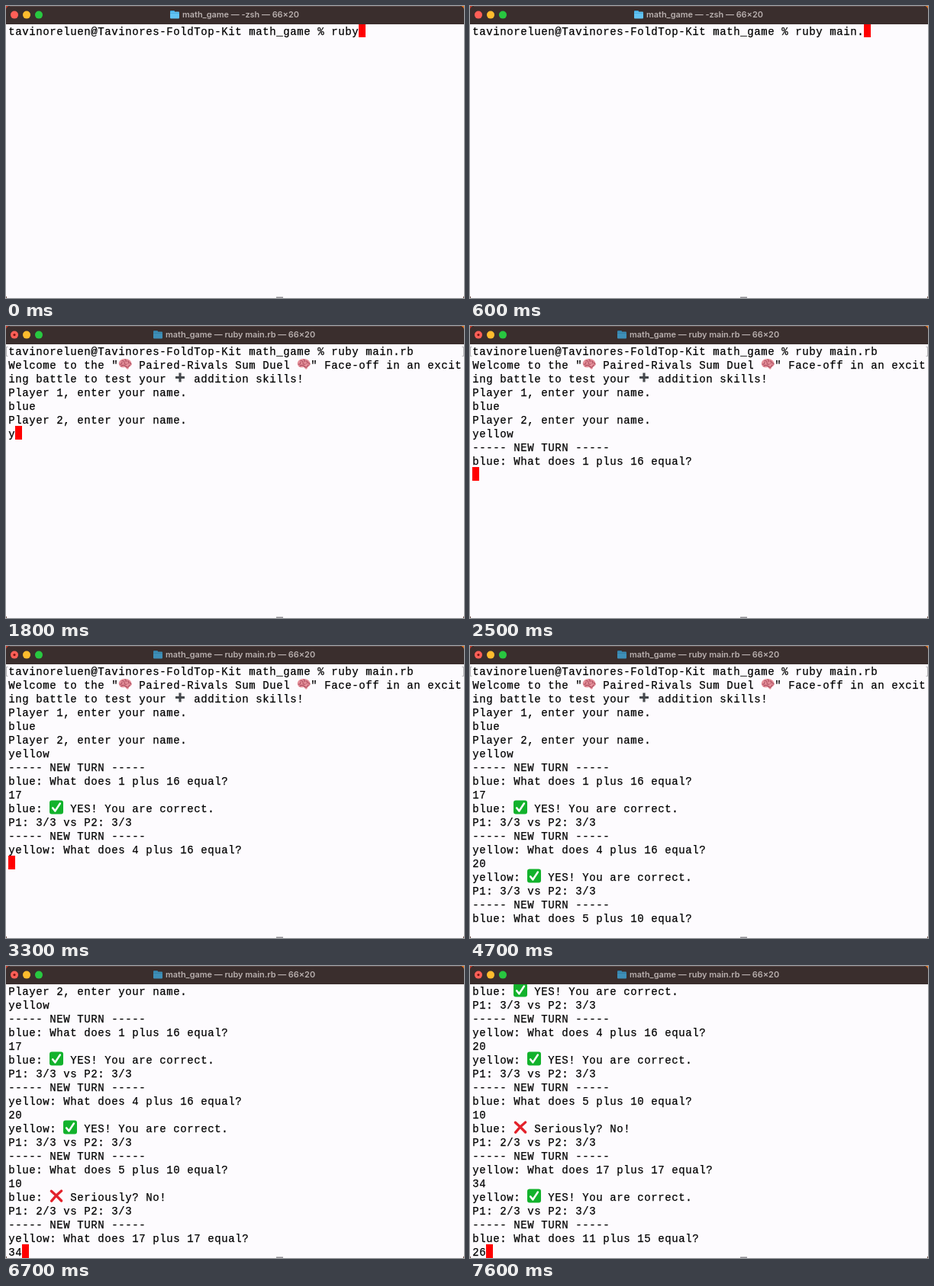
An HTML page with a canvas for the animation above (8 s loop, 600 by 383 pixels).

```html
<!DOCTYPE html>
<html lang="en">
<head>
<meta charset="utf-8">
<title>Terminal game</title>
<style>
html, body { margin: 0; width: 100%; height: 100%; overflow: hidden; background: #fdfbfe; }
canvas { display: block; width: 600px; height: 383px; }
</style>
</head>
<body>
<canvas id="stage" width="600" height="383"></canvas>
<script>
const ctx = document.getElementById('stage').getContext('2d');
const LOOP = 8000, ROWS = 20, CELL = 9, LINE = 18, LEFT = 3, TOP = 23, BAR = 24;
const MONO = '14px "Liberation Mono", monospace';
const SANS = '600 10.9px Inter, "Open Sans", sans-serif';
const LAUNCH = 1000;

// Terminal output, keyed by the moment it appears.
const events = [];
const print = (time, text) => events.push({ time, text });
const type = (time, text, step = 100) =>
  [...text].forEach((ch, i) => print(time + i * step, ch));

const RIGHT = '✅ YES! You are correct.';
const WRONG = '❌ Seriously? No!';
const turn = (name, a, b) => `----- NEW TURN -----\n${name}: What does ${a} plus ${b} equal?\n`;
const result = (name, verdict, lives) => `\n${name}: ${verdict}\nP1: ${lives}/3 vs P2: 3/3\n`;

print(0, 'tavinoreluen@Tavinores-FoldTop-Kit math_game % ruby');
type(100, ' main.rb');
print(LAUNCH, '\nWelcome to the "🧠 Paired-Rivals Sum Duel 🧠" Face-off in an excit\n' +
  'ing battle to test your ➕ addition skills!\nPlayer 1, enter your name.\n');
type(1200, 'blue');
print(1600, '\nPlayer 2, enter your name.\n');
type(1800, 'yellow');
print(2400, '\n' + turn('blue', 1, 16));
type(2600, '17');
print(2900, result('blue', RIGHT, 3) + turn('yellow', 4, 16));
type(3700, '20', 200);
print(4200, result('yellow', RIGHT, 3) + turn('blue', 5, 10));
type(4900, '10', 200);
print(5500, result('blue', WRONG, 2) + turn('yellow', 17, 17));
type(6500, '34', 200);
print(6900, result('yellow', RIGHT, 2) + turn('blue', 11, 15));
type(7300, '26', 200);

function rect(color, x, y, w, h, r = 0) {
  ctx.fillStyle = color;
  ctx.beginPath();
  ctx.roundRect(x, y, w, h, r);
  ctx.fill();
}

function disc(color, x, y, r) {
  ctx.fillStyle = color;
  ctx.beginPath();
  ctx.arc(x, y, r, 0, Math.PI * 2);
  ctx.fill();
}

function stroke(color, width, path, cap = 'round') {
  ctx.strokeStyle = color;
  ctx.lineWidth = width;
  ctx.lineCap = cap;
  ctx.lineJoin = 'round';
  ctx.stroke(new Path2D(path));
}

// Two-column pictograms in an 18 by 18 cell.
const icons = {
  '🧠'() {
    ctx.fillStyle = '#e58f9a';
    ctx.fill(new Path2D('M1 9.5C0 5 4 2 9 2C14 2 18 5 17.5 9.5C17 12 15 12 14 13C14 15.5 12 16.5 11 15L9 13C5 14 2 13 1 9.5Z'));
    stroke('#ad4f60', 1.1, 'M2 9Q5 10 5 6M5 4.5Q8 4 8 7T11 9M9 3Q11 4 10 6M12 5Q15 5 13 8M4 11.5Q7 9 10 12T15 10M15 7L17 9');
  },
  '➕'() {
    stroke('#46494d', 3.2, 'M9 2.5V14.5M3 8.5H15', 'butt');
  },
  '✅'() {
    rect('#12b22c', 0, -0.5, 18, 18, 3);
    stroke('#ffffff', 2.6, 'M4.2 9.5L7.4 13.4L13.8 3.6');
  },
  '❌'() {
    stroke('#e3222b', 3.4, 'M2.4 2.2Q9 8 15.6 15M15.6 2Q8 8 2.6 15.2');
  }
};

function drawLine(line, row) {
  const y = TOP + row * LINE;
  let x = LEFT;
  for (const ch of line) {
    if (icons[ch]) {
      ctx.save();
      ctx.translate(x, y);
      icons[ch]();
      ctx.restore();
      x += CELL * 2;
    } else {
      ctx.fillStyle = ctx.strokeStyle = '#000';
      ctx.lineWidth = 0.25;
      ctx.fillText(ch, x + 0.3, y + 14.5);
      ctx.strokeText(ch, x + 0.3, y + 14.5);
      x += CELL;
    }
  }
  return x;
}

function drawTitleBar(running) {
  const desktop = ctx.createLinearGradient(0, 0, 600, 0);
  desktop.addColorStop(0, '#c23a28');
  desktop.addColorStop(1, '#e8761f');
  rect(desktop, 0, 0, 600, 8);
  rect('#3a2e2d', 0, 0, 600, BAR, [5, 5, 0, 0]);
  rect('#564644', 5, 0, 590, 1);
  ['#ff5f57', '#febc2e', '#28c840'].forEach((color, i) => disc(color, 11 + i * 16, 11.6, 5));
  if (running) disc('#7d1511', 11, 11.6, 1.6);

  const x = running ? 193 : 215;
  rect(running ? '#2f7da6' : '#3aa5dc', x, 6, 6, 4, 1);
  rect(running ? '#3e8fb8' : '#62c3f2', x, 7.5, 12, 9, 1);
  rect(running ? '#347fa5' : '#48aee2', x, 9, 12, 1);
  ctx.font = SANS;
  ctx.fillStyle = '#b9b0af';
  ctx.fillText(`math_game — ${running ? 'ruby main.rb' : '-zsh'} — 66×20`, x + 16, 15);
}

function draw(t) {
  const shown = events.filter(e => e.time <= t);
  const lines = shown.map(e => e.text).join('').split('\n');
  const first = Math.max(0, lines.length - ROWS);
  const running = t >= LAUNCH;

  rect('#fdfbfe', 0, 0, 600, 383);
  ctx.font = MONO;
  let end = LEFT;
  lines.slice(first).forEach((line, row) => { end = drawLine(line, row); });

  // The cursor stays solid while typing and blinks when idle.
  const idle = t - shown[shown.length - 1].time;
  if (idle % 1000 < 500) rect('#ff0000', end, TOP + (lines.length - 1 - first) * LINE, CELL, LINE);

  if (running && first === 0) {
    stroke('#b5b3b7', 1, 'M2.5 27.5H0.5V39.5H2.5M597.5 27.5H599.5V39.5H597.5', 'butt');
  }
  drawTitleBar(running);
  rect('#929094', 354, 381.5, 9, 1.5);
  rect('#6d4a45', 0, 381, 1, 2);
  rect('#6d4a45', 599, 381, 1, 2);
}

const start = performance.now();
function frame() {
  draw((performance.now() - start) % LOOP);
  requestAnimationFrame(frame);
}
frame();
</script>
</body>
</html>
```
